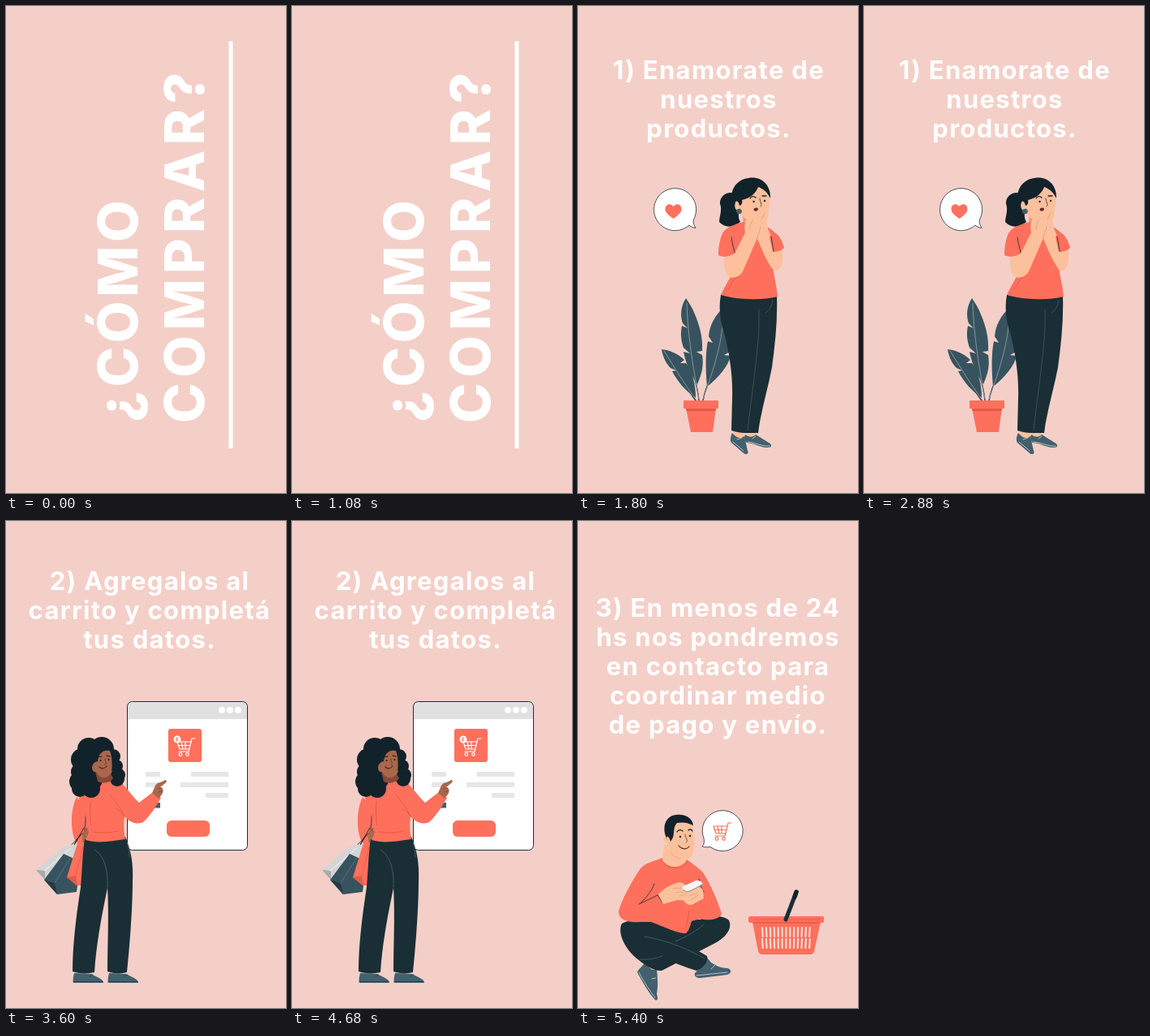
An HTML page that plays this animation: 345x600 px, repeating every 7.2 s.

```html
<!DOCTYPE html>
<html lang="es">
<head>
<meta charset="utf-8">
<title>¿Cómo comprar?</title>
<style>
  html, body { margin: 0; width: 100%; height: 100%; overflow: hidden; background: #f4cfc8; }
  svg { display: block; width: 100%; height: 100%; }
  text { font-family: Inter, "Open Sans", sans-serif; fill: #fff; }
  .title { font-weight: 800; font-size: 67px; }
  .step { font-weight: 700; font-size: 31px; letter-spacing: 1.3px; text-anchor: middle; }
</style>
</head>
<body>
<svg id="stage" viewBox="0 0 345 600"></svg>
<script>
const CORAL = '#ff705c', DEEP = '#e25a49', INK = '#1a2e35', HAIR = '#12222a', LEAF = '#37535f',
      SHOE = '#42606d', SKIN = '#fcc09c', SHADE = '#e99a78', BROWN = '#a9674c', GREY = '#e0e0e0', WHITE = '#fff';

const shape = (d, fill) => `<path d="${d}" fill="${fill}"/>`;
const line = (d, color = INK, w = 1) =>
  `<path d="${d}" fill="none" stroke="${color}" stroke-width="${w}" stroke-linecap="round" stroke-linejoin="round"/>`;
const box = (x, y, w, h, fill, r = 0) =>
  `<rect x="${x}" y="${y}" width="${w}" height="${h}" rx="${r}" fill="${fill}"/>`;
const dot = (x, y, r, fill) => `<circle cx="${x}" cy="${y}" r="${r}" fill="${fill}"/>`;
const outlined = (d) => `<path d="${d}" fill="#fff" stroke="${INK}" stroke-width=".8"/>`;
const lines = (x, y, rows) =>
  rows.map((s, i) => `<text class="step" x="${x}" y="${y + i * 36}">${s}</text>`).join('');
const upright = (x, y, s, gap) =>
  `<text class="title" letter-spacing="${gap}" transform="translate(${x} ${y}) rotate(-90)">${s}</text>`;

function cart(x, y, color) {
  return `<g transform="translate(${x} ${y})">` +
    line('M22 0H18L14 16H2M16.5 4H0L3 13H14.5M5 4L7 13M10 4V13M1 8.5H15', color, 1.2) +
    `<g fill="none" stroke="${color}" stroke-width="1.2"><circle cx="4" cy="19.5" r="1.8"/><circle cx="12.5" cy="19.5" r="1.8"/></g></g>`;
}

function title() {
  return upright(162, 513, '¿CÓMO', 4.6) + upright(244, 514, 'COMPRAR?', 6.4) + box(274.5, 43.5, 5, 501.5, WHITE);
}

function plant() {
  return line('M149 486C148 474 145 463 142 452M154 486C156 475 160 465 165 455M145 486C140 480 136 472 131 465', INK, 1.3) +
    shape('M133 360C126 371 126 382 129 391L135 397L128 394C126 404 127 412 130 421L138 428L130 426C133 441 139 454 147 466C153 452 155 443 153 430L146 426L153 425C154 409 150 394 144 380C141 372 137 366 133 360Z', LEAF) +
    shape('M103 423C105 434 109 441 114 446L121 449L116 450C124 465 134 475 145 483C145 466 141 450 133 440L126 440L131 436C123 428 113 424 103 423Z', LEAF) +
    shape('M179 372C168 382 162 394 161 407L166 415L160 413C157 427 157 446 159 469C173 458 185 444 188 431L180 430L189 425C190 407 187 387 179 372Z', LEAF) +
    line('M134 366C135 400 140 436 149 484M106 425C119 445 132 468 146 485M179 378C179 411 167 449 154 484', '#a9b1b3', .7) +
    shape('M133 495H170L166 525H139Z', CORAL) + shape('M133 496H170L169.500 499H133.500Z', DEEP) + box(130, 486, 43, 10, CORAL, 1);
}

function shopper() {
  return shape('M191 518H203L205 532H192ZM206 518H218L219 532H206Z', SKIN) +
    shape('M190 526C188 530 187 535 189 538L203 550C207 554 211 552 209 548L205 530C200 534 195 532 190 526Z', SHOE) +
    shape('M206 528C204 533 206 536 208 538C218 539 225 544 233 544C239 544 240 541 235 538L219 528C215 532 210 531 206 528Z', SHOE) +
    line('M191 537L204 548M209 537C219 538 227 543 236 542M196 534L202 532M215 533L219 530', '#d9dadb', .8) +
    shape('M176 356C173 372 175 390 181 406C187 430 191 458 190 484L189 523C199 527 210 526 222 526C225 500 234 472 239 445C243 416 246 387 245 357Z', INK) +
    line('M223 374C224 407 219 439 216 467C213 488 211 507 209 523M240 362C239 370 236 375 231 378', '#48616a', .7) +
    shape('M194 231C183 227 174 235 175 244C178 251 174 260 174 266C181 274 192 273 200 266C196 260 199 252 198 246Z', HAIR) +
    shape('M203 252L223 262L226 277L204 278Z', SHADE) +
    shape('M204 266C193 269 183 272 178 280C174 289 173 299 173 307C179 310 187 309 193 305L196 318C190 331 181 345 176 356C197 362 225 363 246 358C245 346 242 335 240 322L244 296L242 279C236 272 228 270 222 270C214 272 209 270 204 266Z', CORAL) +
    line('M189 285C190 292 192 300 194 307', INK, .8) + line('M185 349C190 341 195 333 199 329', DEEP, 1) +
    shape('M193 238C195 224 211 217 225 222C234 227 237 236 236 246C235 257 228 265 219 267C209 265 202 260 199 253C194 253 192 247 194 241Z', SKIN) +
    shape('M190 246C186 228 194 214 210 212C225 209 238 220 237 237C233 229 228 225 222 223C219 231 212 237 202 239C203 243 201 246 199 246C198 240 194 238 193 245Z', HAIR) +
    line('M212 237C214 234 217 234 219 236M227 234L232 234', HAIR, 1.3) +
    dot(216.500, 241, 1.2, HAIR) + dot(230, 240, 1.2, HAIR) +
    line('M224 237C224 242 228 245 225 247', '#4b3430', .9) +
    shape('M216.500 251C217 248 221 248 222 250C222 253 217 254 216.500 251Z', '#6d2929') +
    dot(198.500, 253, 3.3, SHOE) +
    shape('M225 255C227 249 230 246 231 249C235 249 236 255 233 262C232 271 235 278 239 284L252 299C253 310 252 322 247 325C244 327 241 326 239 323C231 312 227 300 221 287Z', SKIN) +
    shape('M240 278C248 281 252 290 254 298C250 302 245 303 240 303L236 285Z', CORAL) + line('M238 284L241 302', INK, .8) +
    shape('M180 309C179 321 181 329 187 334C194 336 200 332 203 327L220 288C224 279 225 270 227 261C225 254 223 252 220 258L215 264C216 259 213 256 211 259C206 264 204 270 206 279L193 305C188 309 184 310 180 309Z', SKIN) +
    line('M215 264C213 268 212 271 212 275M220 288C222 282 224 277 225 272M226 263L230 255', SHADE, .9);
}

function stepOne() {
  return lines(173.500, 90, ['1) Enamorate de', 'nuestros', 'productos.']) + plant() + shopper() +
    outlined('M137 270A26 26 0 1 1 143 262C141 266 143 270 145 273.500C142 273 139 272 137 270Z') +
    shape('M117.500 262C112 258 107.500 255 107.500 250C107.500 244 114 242 117.500 247C121 242 127.500 244 127.500 250C127.500 255 123 258 117.500 262Z', CORAL);
}

function browser() {
  const bars = [[172, 309, 18], [172, 322, 18], [228, 309, 46], [215, 322, 59], [246, 335, 28]];
  return box(149.5, 222.5, 148, 183, WHITE, 6) + shape('M149.5 244V229Q149.500 222.500 156 222.500H291Q297.500 222.500 297.500 229V244Z', GREY) +
    `<rect x="149.500" y="222.500" width="148" height="183" rx="6" fill="none" stroke="${INK}"/>` +
    [266, 276, 286].map(x => dot(x, 233, 4, WHITE)).join('') +
    box(200, 256, 41, 41, CORAL, 3) + cart(211, 268, WHITE) + dot(211, 269, 4.5, WHITE) + line('M212 267H210V271H212M210 269H211.500', CORAL, .9) +
    bars.map(([x, y, w]) => box(x, y, w, 6, '#e6e6e6')).join('') +
    box(181, 347, 9, 6.500, SHOE) + box(198, 369, 53, 20, CORAL, 6);
}

function bags() {
  return line('M96 378L77 412M100 379L72 408M99 386L91 422M91 387L70 421', HAIR, .9) +
    shape('M71 401L37 430L48 442L89 409L84 398Z', '#d5d5d5') + shape('M37 430L48 431L48 442Z', '#aaa') +
    line('M47 431L80 403', '#f5f5f5', 1) +
    shape('M71 410L47 442L63 460L87 457L92 420Z', LEAF) + shape('M47 442L60 446L63 460Z', '#273a41') +
    line('M60 446L79 416', '#65777d', .8) +
    shape('M88 397L75 439L87 449H96L100 398Z', CORAL) + shape('M75 439L86 437L88 449Z', DEEP) + line('M86 437L95 402', DEEP, .8);
}

function guide() {
  const curls = [[102, 281, 14], [118, 281, 15], [94, 294, 14], [91, 309, 11], [90, 321, 12], [91, 330, 10], [104, 318, 15],
                 [105, 330, 11], [132, 290, 9], [136, 302, 8], [138, 313, 9], [110, 302, 14]];
  const foot = 'M1 0C0 4 -1 8 0 12H37C37 7 29 5 22 1Z';
  const feet = [83, 126].map(x => `<g transform="translate(${x} 557)">` + shape(foot, SHOE) + line('M0 10.500H36M20 4L24 2', '#263a43', .8) + '</g>').join('');
  return shape('M87 340C80 354 79 376 84 391C87 398 94 402 100 397L104 378L96 350Z', CORAL) +
    line('M97 350C99 361 98 375 96 386', INK, .8) + bags() +
    shape('M94 386C96 379 102 379 104 386C105 394 98 399 94 395Z', BROWN) + feet +
    shape('M97 392C94 410 94 430 92 451C87 484 82 520 82 555C90 558 101 558 109 556C111 521 119 481 125 452C127 484 125 521 125 555C133 558 142 558 149 556C153 516 156 475 156 442C157 422 154 405 147 389Z', INK) +
    line('M109 405C121 412 126 430 125 451M149 396C151 402 152 407 152 414', '#52666d', .8) +
    shape('M112 317C101 322 92 330 90 341C91 355 99 363 104 376C102 385 100 388 98 393C114 398 131 394 147 392C145 382 145 371 146 364C154 373 163 374 169 371C177 364 184 353 191 341L181 334L164 347C155 339 149 328 139 320Z', CORAL) +
    line('M127 337C135 344 141 354 146 364M146 364C143 359 139 356 136 355M107 383C118 385 130 384 138 382M104 346C103 357 104 366 104 376', DEEP, 1) +
    shape('M180 335L184 326C187 321 191 323 196 319C199 319 198 322 195 324L190 328C195 329 194 334 192 337L188 342Z', BROWN) +
    line('M187 330L192 329M188 334L192 333', '#703d30', .7) +
    curls.map(([x, y, r]) => dot(x, y, r, HAIR)).join('') +
    dot(137, 318, 9, HAIR) +
    shape('M109 304L113 321C119 324 128 323 132 317L124 303Z', '#854a38') +
    shape('M111 286C116 279 124 277 128 283C131 291 131 301 130 309C126 319 115 318 111 309C106 311 104 301 109 298Z', BROWN) +
    shape('M107 298C108 285 114 276 122 277L130 284C120 280 114 287 113 296Z', HAIR) +
    line('M113 291L118 290M124 289L128 290', HAIR, 1.2) + dot(116.500, 295, 1.1, HAIR) + dot(126.500, 294, 1.1, HAIR) +
    line('M122 293C122 297 125 299 122 300', '#693729', .9) + line('M115 303C118 306 122 305 124 302', '#5e211f', 1.2);
}

function stepTwo() {
  return lines(177, 85, ['2) Agregalos al', 'carrito y completá', 'tus datos.']) + browser() + guide();
}

function basket() {
  let slats = '';
  for (let row = 0; row < 2; row++)
    for (let i = 0; i < 13; i++) {
      const x = 227 + i * 4.9, top = 501 + row * 14, lean = (257 - x) * .025;
      slats += line(`M${x} ${top}L${x + lean} ${top + 11}`, '#f8d9d3', 2.2);
    }
  return shape('M215 494H299L291 530Q290 534 286 534H227Q223 534 222 530Z', CORAL) + slats +
    box(210, 487, 93, 8, CORAL, 2) + line('M216 495H297', DEEP, 1.3) + line('M217 491H251M262 491H298', DEEP, .8) +
    line('M256 491L269 457', INK, 5) + line('M269 457L267 463', HAIR, 5.500);
}

function sitter() {
  return shape('M86 540L96 550L94 560L79 555ZM151 537L161 547L157 557L146 550Z', SKIN) +
    shape('M84 541C81 548 74 552 73 556C80 569 87 581 95 590C98 592 99 588 97 583C99 571 98 563 97 552C92 555 86 551 84 541Z', SHOE) +
    shape('M159 538C156 546 149 552 144 557C143 561 146 563 151 563L184 559C190 557 189 552 184 551C175 551 169 547 164 544Z', SHOE) +
    line('M75 556C82 569 89 580 95 587M146 560L184 556M91 564L96 563M164 552L169 547', '#d9dadb', .8) +
    shape('M54 496C66 489 92 491 108 492L150 491C163 486 179 485 186 492C191 503 181 514 167 521L105 553C100 557 84 549 75 541C62 532 47 510 54 496Z', INK) +
    shape('M54 497C65 491 86 499 106 506C125 515 142 526 159 536C161 543 153 552 146 554C120 546 89 532 67 521C55 515 51 506 54 497Z', INK) +
    line('M82 512C107 516 136 527 156 539M120 518C134 512 146 505 155 497M76 540C86 541 96 539 104 536', '#546970', .7) +
    shape('M104 415C93 419 82 422 77 428C65 446 54 466 50 481C50 492 62 495 76 494L90 494C106 500 122 508 133 508C138 503 138 498 140 493L150 490C161 493 174 491 177 484C172 468 164 449 154 433C148 427 141 422 134 417C129 427 113 429 104 415Z', CORAL) +
    shape('M106 398L104 418C112 429 126 428 133 419L130 404Z', SKIN) +
    line('M103 418C110 430 129 431 135 420M137 480C137 486 135 492 133 500', DEEP, 1) +
    line('M94 447C91 456 84 464 77 471M75 472L98 461M98 461L105 471M149 441C151 449 152 453 155 457M150 456L155 464', INK, .8) +
    shape('M99 460C106 453 112 449 119 447C125 444 129 445 133 449L143 461C140 467 129 468 122 467L105 472Z', SKIN) +
    shape('M154 455C151 450 145 448 139 453L128 463C130 470 136 475 142 472L155 465Z', SKIN) +
    shape('M128 451L145 443Q150 442 154 447L137 456Q132 458 128 451Z', '#f5f5f5') + line('M130 455Q133 458 138 456L154 448', '#879094', 1) +
    line('M117 453L127 452M121 458L130 457M125 462L133 460M137 462L147 458M139 467L148 461', SHADE, .8) +
    shape('M107 389C104 380 112 373 124 371L140 374C144 386 145 400 141 410C137 420 126 420 114 413C109 405 109 400 110 397C105 396 104 391 107 389Z', SKIN) +
    shape('M110 392C104 382 105 366 118 362.500C128 360 141 364 142 375C134 371 128 371 122 372C117 377 119 384 117 390L114 395C112 387 108 387 110 392Z', HAIR) +
    line('M122 383C124 380 127 380 129 382M136 381C138 379 140 380 141 382', HAIR, 1.3) +
    dot(126, 389, 1.2, HAIR) + dot(138, 388, 1.2, HAIR) + line('M132 386C132 391 137 394 133 396', '#80513f', 1) +
    line('M124 400C128 405 134 405 137 401', '#61332e', 1.2) + line('M114 408C117 413 121 415 126 416', SHADE, .8);
}

function stepThree() {
  return lines(172.500, 118, ['3) En menos de 24', 'hs nos pondremos', 'en contacto para', 'coordinar medio', 'de pago y envío.']) +
    basket() + sitter() +
    outlined('M154 388A25 25 0 1 1 163 401.500C160 402 156 402 153 401C156 398 156 393 154 388Z') + cart(167, 372, CORAL);
}

const HOLD = 1800;
const stage = document.getElementById('stage');
stage.innerHTML = box(0, 0, 345, 600, '#f4cfc8') +
  [title, stepOne, stepTwo, stepThree].map(draw => `<g class="scene" display="none">${draw()}</g>`).join('');
const scenes = [...stage.querySelectorAll('.scene')];

function show(ms) {
  const current = Math.floor(ms / HOLD) % scenes.length;
  scenes.forEach((g, i) => g.setAttribute('display', i === current ? 'inline' : 'none'));
}

const start = performance.now();
function tick() {
  show(performance.now() - start);
  requestAnimationFrame(tick);
}
tick();
</script>
</body>
</html>
```
